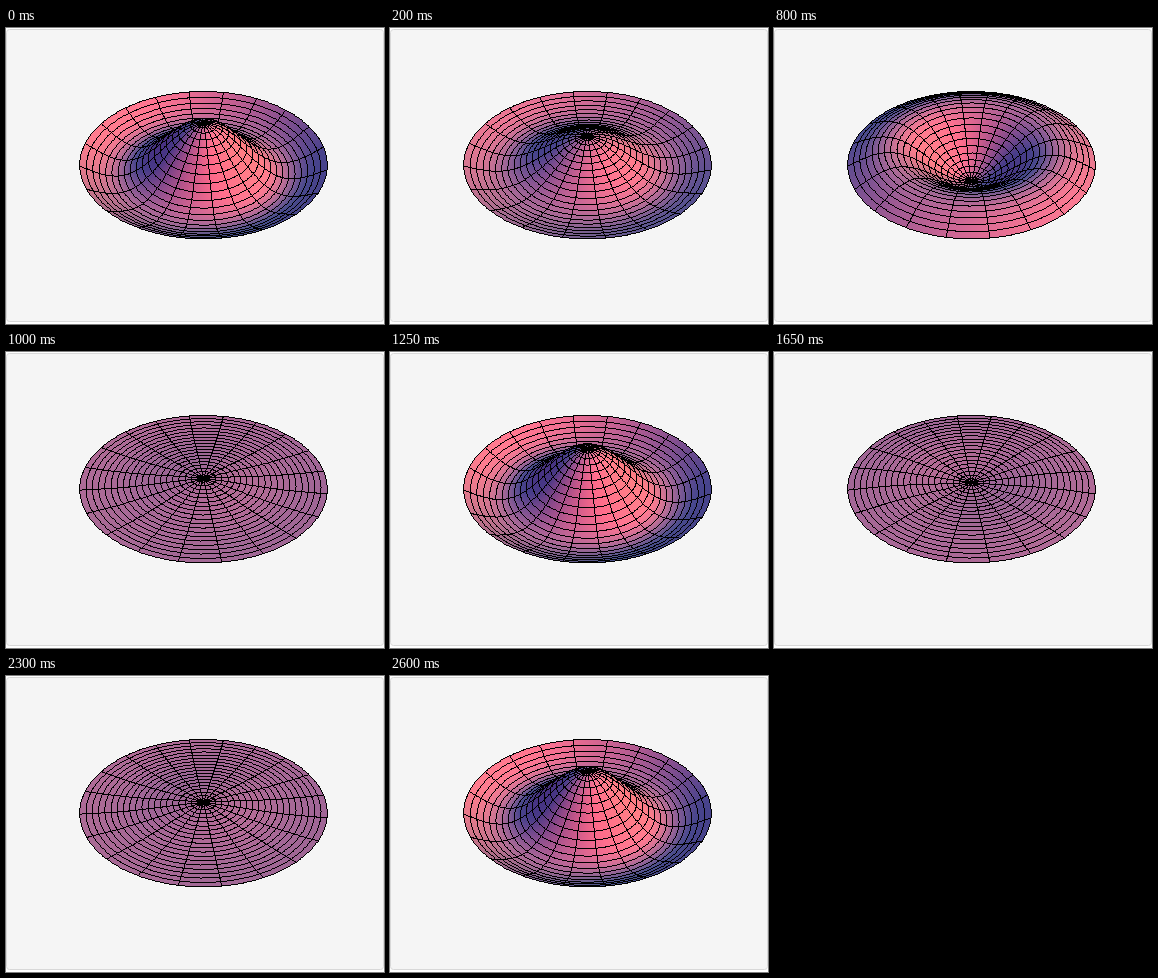
Write an HTML page with a canvas that moves like this. It is 378 px wide and 296 px high and loops after 2.65 s.

```html
<!DOCTYPE html>
<html lang="en">
<head>
<meta charset="utf-8">
<title>Vibrating drum, mode (0,2)</title>
<style>
  html, body { margin: 0; width: 378px; height: 296px; overflow: hidden; background: #fff; }
  canvas { display: block; }
</style>
</head>
<body>
<canvas id="stage" width="378" height="296"></canvas>
<script>
const W = 378, H = 296;
const STEP = 50, STEPS = 53, PERIOD = 1300, PEAK = STEP / 4;
const SPOKES = 20, RINGS = 20, SUB_A = 4, SUB_R = 2;
const NA = SPOKES * SUB_A, NR = RINGS * SUB_R;
const K = 5.5201, RADIUS = 0.5, AMP = 0.162;

// Perspective camera at (1.3, -2.4, 2), looking at the centre of the drum
const DIST = Math.hypot(1.3, 2.4, 2);
const SIN = 2 / DIST, COS = Math.hypot(1.3, 2.4) / DIST;
const TURN = Math.atan2(1.3, 2.4);
const SCALE = 832, CX = 197.5, CY = 128.4;
const BIAS = 0.0015;

const ctx = document.getElementById('stage').getContext('2d');
ctx.fillStyle = '#fff';
ctx.fillRect(0, 0, W, H);
ctx.beginPath();
ctx.roundRect(0.5, 1.5, W - 1, H - 4, 3);
ctx.fillStyle = '#f5f5f5';
ctx.fill();
ctx.strokeStyle = '#d8d8d8';
ctx.stroke();
const base = ctx.getImageData(0, 0, W, H);
const image = ctx.createImageData(W, H);
const px = image.data;
const zbuf = new Float32Array(W * H);

function bessel(n, x) {
  const m = 64;
  let sum = 0;
  for (let i = 0; i < m; i++) {
    const t = (i + 0.5) * Math.PI / m;
    sum += Math.cos(n * t - x * Math.sin(t));
  }
  return sum / m;
}

const profile = Array.from({ length: NR + 1 }, (_, i) => {
  const x = K * i / NR;
  return { rho: RADIUS * i / NR, z: AMP * bessel(0, x), slope: -AMP * K / RADIUS * bessel(1, x) };
});

// Coloured lights fixed to the camera
function shade(x, y, z) {
  const right = Math.max(0, (x + z) / Math.SQRT2);
  const corner = Math.max(0, (x + y + z) / Math.sqrt(3));
  const top = Math.max(0, (y + z) / Math.SQRT2);
  return [
    0.28 + 0.90 * right,
    0.15 + 0.06 * right + 0.29 * corner,
    0.33 + 0.26 * top
  ].map(v => 255 * Math.min(1, v));
}

function vertex(p, a, amp) {
  const c = Math.cos(a), s = Math.sin(a);
  const z = p.z * amp, slope = p.slope * amp;
  const near = p.rho * s;
  const inv = 1 / (DIST - near * COS - z * SIN);
  const len = Math.hypot(1, slope);
  const nx = -slope * c / len, nn = -slope * s / len, nz = 1 / len;
  return {
    x: CX + SCALE * p.rho * c * inv,
    y: CY - SCALE * (z * COS - near * SIN) * inv,
    inv,
    rgb: shade(nx, nz * COS - nn * SIN, nn * COS + nz * SIN)
  };
}

function triangle(a, b, c) {
  const area = (b.x - a.x) * (c.y - a.y) - (b.y - a.y) * (c.x - a.x);
  if (Math.abs(area) < 1e-9) return;
  const x0 = Math.floor(Math.min(a.x, b.x, c.x)), x1 = Math.ceil(Math.max(a.x, b.x, c.x));
  const y0 = Math.floor(Math.min(a.y, b.y, c.y)), y1 = Math.ceil(Math.max(a.y, b.y, c.y));
  for (let y = y0; y < y1; y++) {
    for (let x = x0; x < x1; x++) {
      const qx = x + 0.5, qy = y + 0.5;
      const u = ((b.x - qx) * (c.y - qy) - (b.y - qy) * (c.x - qx)) / area;
      const v = ((c.x - qx) * (a.y - qy) - (c.y - qy) * (a.x - qx)) / area;
      const w = 1 - u - v;
      if (u < -1e-6 || v < -1e-6 || w < -1e-6) continue;
      const inv = u * a.inv + v * b.inv + w * c.inv;
      const i = y * W + x;
      if (inv <= zbuf[i]) continue;
      zbuf[i] = inv;
      for (let k = 0; k < 3; k++) px[4 * i + k] = u * a.rgb[k] + v * b.rgb[k] + w * c.rgb[k];
    }
  }
}

function line(a, b) {
  const n = Math.max(1, Math.ceil(Math.max(Math.abs(b.x - a.x), Math.abs(b.y - a.y))));
  for (let j = 0; j <= n; j++) {
    const t = j / n;
    const i = Math.floor(a.y + (b.y - a.y) * t) * W + Math.floor(a.x + (b.x - a.x) * t);
    if (a.inv + (b.inv - a.inv) * t + BIAS < zbuf[i]) continue;
    px[4 * i] = px[4 * i + 1] = px[4 * i + 2] = 0;
  }
}

function draw(time) {
  const amp = Math.cos(2 * Math.PI * (time - PEAK) / PERIOD);
  px.set(base.data);
  zbuf.fill(0);
  const grid = profile.map(p =>
    Array.from({ length: NA + 1 }, (_, j) => vertex(p, TURN + 2 * Math.PI * j / NA, amp)));
  for (let i = 0; i < NR; i++) {
    for (let j = 0; j < NA; j++) {
      const a = grid[i][j], b = grid[i + 1][j], c = grid[i + 1][j + 1], d = grid[i][j + 1];
      triangle(a, b, c);
      triangle(a, c, d);
    }
  }
  for (let i = 0; i < NR; i++) {
    for (let j = 0; j < NA; j++) {
      if (j % SUB_A === 0) line(grid[i][j], grid[i + 1][j]);
      if ((i + 1) % SUB_R === 0) line(grid[i + 1][j], grid[i + 1][j + 1]);
    }
  }
  ctx.putImageData(image, 0, 0);
}

const start = performance.now();
let shown = -1;
function tick() {
  const step = Math.floor((performance.now() - start) / STEP) % STEPS;
  if (step !== shown) draw((shown = step) * STEP);
  requestAnimationFrame(tick);
}
tick();
</script>
</body>
</html>
```
